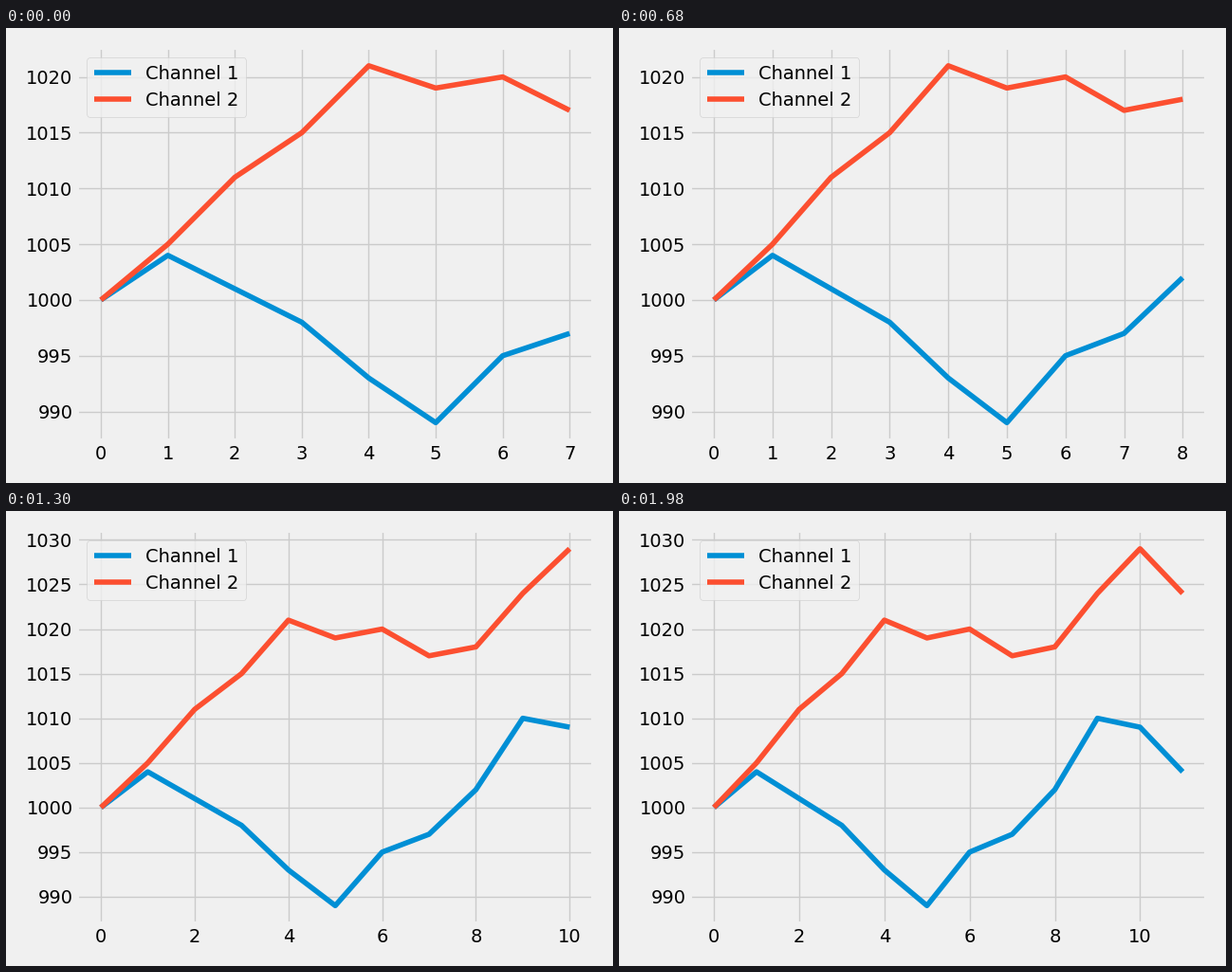
Recreate the animation shown at these times as a matplotlib script. Size 640 px wide and 480 px high, loop 2 s.

```python
from itertools import accumulate

import matplotlib.pyplot as plt
from matplotlib.animation import FuncAnimation

plt.style.use("fivethirtyeight")

FRAMES = 100
INTERVAL = 20      # ms
START_POINTS = 8
STEP = 30          # frames between new readings
PHASE = 25         # frames already elapsed when the loop starts
BASE = 1000


def walk(*steps):
    """Running total of the steps, starting at the base level."""
    return list(accumulate(steps, initial=BASE))


channels = [
    walk(4, -3, -3, -5, -4, 6, 2, 5, 8, -1, -5),
    walk(5, 6, 4, 6, -2, 1, -3, 1, 6, 5, -5),
]

fig, ax = plt.subplots(figsize=(6.4, 4.8), dpi=100)
lines = [ax.plot([], [], label=f"Channel {k}")[0]
         for k, _ in enumerate(channels, 1)]
ax.legend(loc="upper left")


def show_points(count):
    for line, values in zip(lines, channels):
        line.set_data(range(count), values[:count])
    ax.relim()
    ax.autoscale_view()


def update(frame):
    show_points(START_POINTS + (frame + PHASE) // STEP)
    return lines


show_points(START_POINTS)
fig.tight_layout()

anim = FuncAnimation(fig, update, frames=FRAMES, interval=INTERVAL,
                     repeat=True, repeat_delay=0, blit=False)
plt.show()
```
